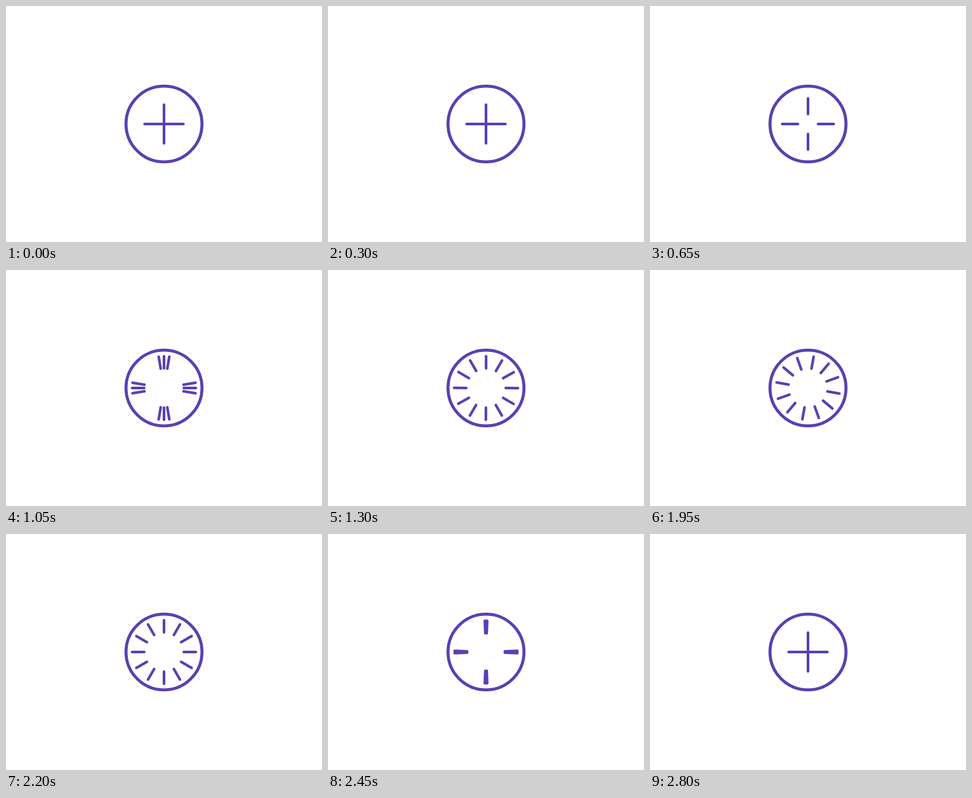
Write an HTML page that moves like this. It is 480 px wide and 360 px high and loops after 2850 ms.

```html
<!DOCTYPE html>
<html lang="en">
<head>
<meta charset="utf-8">
<title>Plus to spinner</title>
<style>
  html, body { margin: 0; width: 100%; height: 100%; overflow: hidden; background: #fff; }
  svg { display: block; width: 100%; height: 100%; }
  .mark { fill: none; stroke: #5a40b0; stroke-linecap: round; }
</style>
</head>
<body>
<svg viewBox="0 0 480 360">
  <g class="mark" transform="translate(240 180)">
    <circle r="57.7" stroke-width="4.6"/>
    <path id="spokes" stroke-width="4"/>
  </g>
</svg>
<script>
  const LOOP = 2850;
  const spokes = document.getElementById('spokes');

  // Each track is a list of [time, value, easing towards this step].
  const linear = p => p;
  const smooth = p => p < 0.5 ? 4 * p ** 3 : 1 - 4 * (1 - p) ** 3;
  const soft = p => p * p * (3 - 2 * p);
  const tracks = {
    spread: [[400, 0], [900, 1, smooth], [2400, 1, linear], [2800, 0, soft]],
    fan: [[900, 0], [1300, 30, soft], [2200, 30, linear], [2500, 0, soft]],
    spin: [[1300, 0], [2200, 180, linear]]
  };

  function valueAt(track, time) {
    if (time <= track[0][0]) return track[0][1];
    for (let i = 1; i < track.length; i++) {
      const [start, from] = track[i - 1];
      const [end, to, ease] = track[i];
      if (time < end) return from + (to - from) * ease((time - start) / (end - start));
    }
    return track[track.length - 1][1];
  }

  function spoke(degrees, inner, outer) {
    const angle = degrees * Math.PI / 180;
    const point = radius =>
      `${(radius * Math.sin(angle)).toFixed(3)} ${(-radius * Math.cos(angle)).toFixed(3)}`;
    return `M${point(inner)}L${point(outer)}`;
  }

  function draw(time) {
    const spread = valueAt(tracks.spread, time);
    const fan = valueAt(tracks.fan, time);
    const spin = valueAt(tracks.spin, time);
    const inner = 30 * spread;
    const outer = 29.5 + 19 * spread;
    let path = '';
    for (let axis = 0; axis < 360; axis += 90) {
      for (const side of fan ? [-1, 0, 1] : [0]) {
        path += spoke(axis + side * fan + spin, inner, outer);
      }
    }
    spokes.setAttribute('d', path);
  }

  const started = performance.now();
  function tick() {
    draw((performance.now() - started) % LOOP);
    requestAnimationFrame(tick);
  }
  tick();
</script>
</body>
</html>
```
